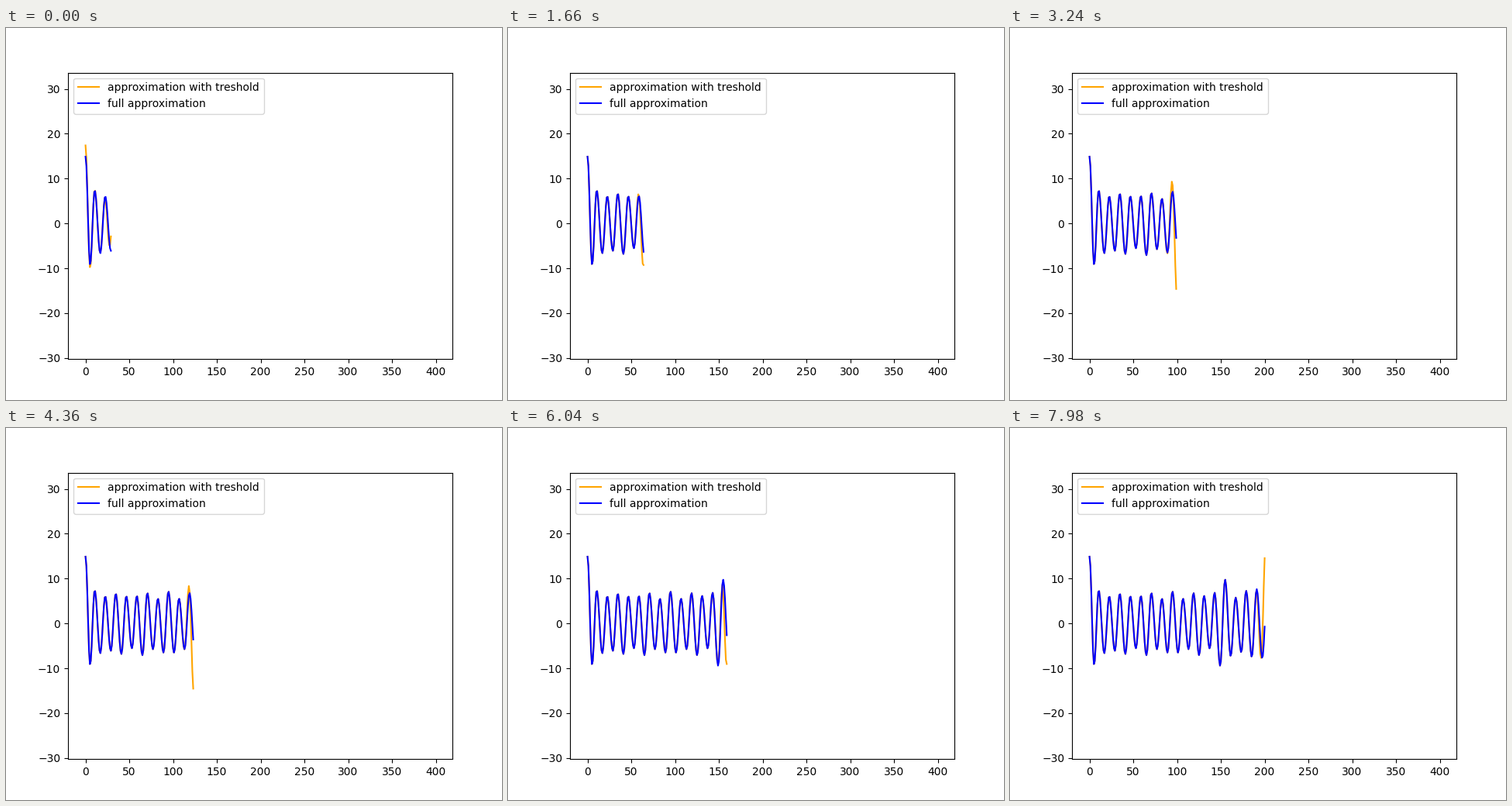
A matplotlib script for the animation above (8 s loop, 640 by 480 pixels).

```python
import numpy as np
import matplotlib.pyplot as plt
from matplotlib.animation import FuncAnimation

STEP = 20            # ms per frame
LOOP = 8000          # ms
FIRST = 29           # last sample shown at the start
HALF = 6.015         # samples from a peak to the next trough
OMEGA = np.pi / HALF


def bump(k, centre, width):
    return np.exp(-((k - centre) / width) ** 2)


def turning_points():
    """Alternating peaks and troughs: a loud start, a slow beat, two swells."""
    k = np.arange(36)
    x = np.maximum(5.25 * k, HALF * k - 1.53 + 0.35 * (k % 2))
    height = 6.3 + 8.6 * np.exp(-1.1 * k)
    height += 0.85 * np.minimum(k / 10, 1) * np.cos(2 * np.pi * (k - 11.3) / 4.7)
    height += 3.0 * bump(k, 25.7, 1.5) + 2.3 * bump(k, 32.5, 1.5)
    return x, height * (-1.0) ** k


def smooth(x, kx, ky):
    """Half-cosine curve through the knots."""
    i = np.searchsorted(kx, x, side="right") - 1
    u = (x - kx[i]) / (kx[i + 1] - kx[i])
    return ky[i] + (ky[i + 1] - ky[i]) * (1 - np.cos(np.pi * u)) / 2


def fade(d):
    return np.exp(-d / 6 - (d / 9) ** 2)


X = np.arange(201)
KX, KY = turning_points()
FULL = smooth(X, KX, KY)
PHASE = np.interp(X, KX, np.pi * np.arange(len(KX)))


def last_sample(t):
    """Samples arrive in threes: two short waits of 20 ms, then one of 100 ms."""
    group, rest = divmod(t + 20, 140)
    return FIRST - 1 + 3 * group + min(rest // 20, 2)


def thresholded(n):
    """The signal with an error that swings ahead of it at the moving end."""
    x = X[:n + 1]
    back = n - x
    lead = np.radians(100 + 28 * np.cos(2 * np.pi * (n - 20) / 152))
    amp = (12 + 0.02 * n) * (0.4 + 0.6 * np.sin(PHASE[n]) ** 2)
    tail = amp * fade(back) * np.cos(PHASE[n] + lead - OMEGA * back)
    head = 0.78 * np.clip(tail[-1], 0, 4.5) * np.exp((FIRST - n) / 25)
    return FULL[:n + 1] + tail + head * fade(x) * np.cos(OMEGA * x)


fig, ax = plt.subplots(figsize=(6.4, 4.8), dpi=100)
ax.set_xlim(-20, 419)
ax.set_ylim(-30.24, 33.63)
approx, = ax.plot([], [], color="orange", label="approximation with treshold")
full, = ax.plot([], [], color="blue", label="full approximation")
ax.legend(loc="upper left")


def update(i):
    n = last_sample(i * STEP)
    approx.set_data(X[:n + 1], thresholded(n))
    full.set_data(X[:n + 1], FULL[:n + 1])
    return approx, full


anim = FuncAnimation(fig, update, frames=LOOP // STEP, interval=STEP,
                     init_func=lambda: update(0), blit=True,
                     repeat=True, repeat_delay=0)
plt.show()
```
